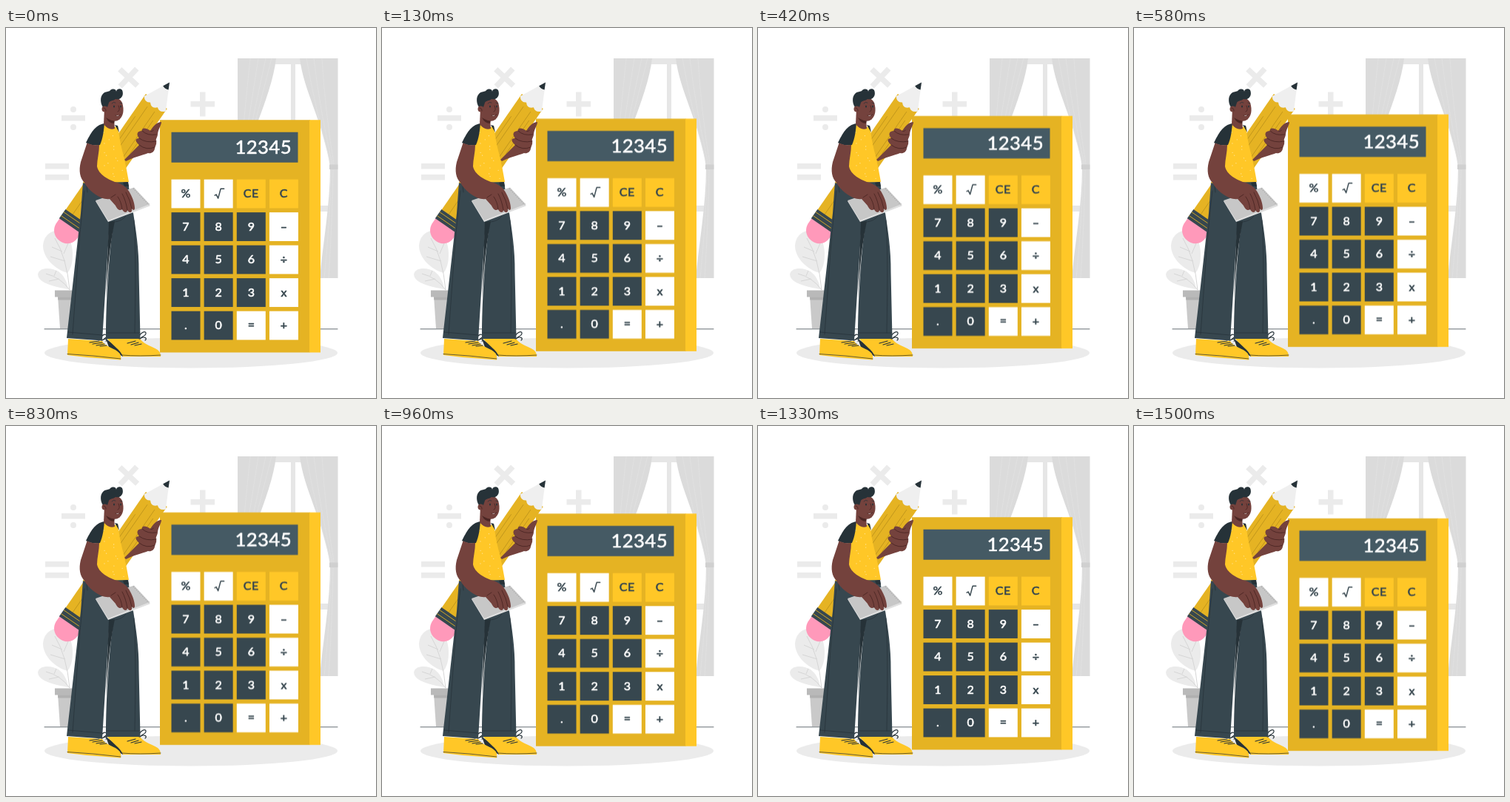
An HTML page for the animation above (1.54 s loop, 500 by 500 pixels).

```html
<!DOCTYPE html>
<html lang="en">
<head>
<meta charset="utf-8">
<title>Calculator</title>
<style>
html, body { margin: 0; width: 100%; height: 100%; overflow: hidden; background: #fff; }
svg { display: block; width: 100%; height: 100%; }
text {
  font-family: Lato, "Open Sans", sans-serif;
  text-anchor: middle;
  stroke: currentColor;
  stroke-width: .6;
  stroke-linejoin: round;
  fill: currentColor;
}
#calc { animation: float 770ms linear -65ms infinite alternate; }
@keyframes float {
  from { transform: translateY(.5px); }
  to { transform: translateY(-9.5px); }
}
.line, .lace { fill: none; stroke: #263238; stroke-width: .7; stroke-linecap: round; stroke-linejoin: round; }
.lace { stroke-width: 1.2; }
.skin { fill: #74423d; }
.skinLine { fill: none; stroke: #4b2624; stroke-width: .9; stroke-linecap: round; }
.dark { fill: #263238; }
.cloth { fill: #37474f; }
.yellow { fill: #ffc727; }
.gold { fill: #e5b323; }
</style>
</head>
<body>
<svg viewBox="0 0 500 500">
  <!-- window -->
  <g>
    <path fill="#e6e6e6" d="M360 41h42v8h-42zM385 41h6v90h-6zM423 240h12v8h-12z"/>
    <path fill="#dbdbdb" d="M313 41H365C362 68 350 101 339 130H313z"/>
    <path fill="#dbdbdb" d="M397 41H448.500V338H424C428 292 438 240 438 188C430 130 402 85 397 41z"/>
    <path fill="none" stroke="#e3e3e3" stroke-width=".7" d="M330 41L321 130M341 41L327 130M351 41L332 130M359 41L336 130M406 41Q418 110 439 184M416 41Q424 110 441 184M427 41Q431 110 443 184M439 192Q438 260 430 338M442 192Q441 260 436 338"/>
    <path fill="#d0d0d0" d="M437 184.500h11.500v6.500h-11.500z"/>
  </g>
  <!-- floating signs -->
  <g fill="#ebebeb">
    <g id="plus"><rect x="249.500" y="99" width="32.500" height="7.500"/><rect x="262" y="86.500" width="7.500" height="33"/></g>
    <use href="#plus" transform="translate(165.500 67) rotate(43) translate(-265.750 -103)"/>
    <rect x="75" y="118" width="32" height="7.500"/><circle cx="91" cy="110" r="4"/><circle cx="91" cy="134" r="4"/>
    <rect x="53" y="183" width="32" height="7.500"/><rect x="53" y="198" width="32" height="7.500"/>
  </g>
  <!-- plant -->
  <g>
    <path fill="#ebebeb" d="M83 331C68 327 50 312 50 294C51 278 64 272 76 273C91 281 95 317 83 331z"/>
    <path fill="#ebebeb" d="M84 353C69 350 44 346 43 333C45 322 63 324 71 329C79 335 83 344 84 353z"/>
    <path fill="none" stroke="#d6d6d6" stroke-width="1" d="M66 284Q82 310 86 354M54 332Q74 337 86 354M76 302l-14-6M80 315l-20-6M78 305l6-14M65 335l3-7M72 339l-14 3"/>
    <path fill="#c9c9c9" d="M70 362H104L101 406H73z"/>
    <path fill="#b9b9b9" d="M66 354.500h40v9H66z"/>
    <path fill="#b0b0b0" d="M70 363.500h33v4H70.300z"/>
  </g>
  <ellipse cx="250" cy="439" rx="198" ry="20.500" fill="#ebebeb"/>
  <path class="line" d="M52 406.800H448"/>

  <!-- pencil: local x runs from the tip to the eraser -->
  <g transform="translate(221 73.500) rotate(124.700)">
    <path fill="#ff99ba" d="M234-17.500H244C266-17 266 16 244 17.500H234z"/>
    <path class="gold" d="M31-17.500H224V17.500H31z"/>
    <path fill="#efefef" d="M0 0L35-18Q42-12 37-6Q44 0 37 6Q42 12 35 17.500z"/>
    <path class="dark" d="M0 0L9-4.500Q11 0 9 4.500z"/>
    <path fill="none" stroke="#bd931b" stroke-width=".8" d="M44-6H222M44 6H222M55-11H110M64 12H120"/>
    <path class="cloth" d="M221-18H236V18H221z"/>
    <path fill="none" stroke="#e5b323" stroke-width=".8" d="M225.500-18V18M231.500-18V18"/>
  </g>

  <g id="calc">
    <path class="gold" d="M208 124.600H411V439H208z"/>
    <path class="yellow" d="M410 124.600h15V439H410z"/>
    <path fill="#455a64" d="M223.500 141.200h171V182h-171z"/>
    <text x="347.700" y="170.500" font-size="25.700" letter-spacing=".4" color="#fff">12345</text>
  </g>

  <!-- far arm -->
  <path class="skin" d="M160 178L180 158C174 153 174 149 180 149C175 143 178 139 184 139C183 135 188 134 195 139C199 132 204 127 210 127C210 131 206 136 205 143C205 148 202 149 203 153C204 158 201 160 201 163C200 168 196 170 192 169C184 172 172 175 162 180z"/>
  <path class="skinLine" d="M184 139Q191 146 203 144M180 149Q189 156 203 153M180 158Q190 166 201 161M195 139Q198 141 199 138"/>

  <!-- shoes -->
  <path class="dark" d="M135 420L159 437L158 444L140 434z"/>
  <path class="yellow" d="M137 420H181C187 428 199 431 205 435Q209 438 209 444H158C155 435 143 428 137 420z"/>
  <path class="line" d="M157 442Q180 444 209 442"/>
  <path class="lace" d="M164 426l11-3M169 428l10-3M174 429l9-2M180 420C178 414 188 408 189 412C190 416 183 417 181 420C186 416 192 419 188 422"/>
  <path class="yellow" d="M84 420L130 423C134 431 148 433 153 439Q156 442 155 448.500L109 445L83 442z"/>
  <path class="line" d="M83 440.500L118 443L155 447"/>
  <path class="lace" d="M113 425l13-2M117 427l13-2M122 429l11-2M127 430l9-1M129 422C127 415 135 412 136 416C136 419 132 420 130 422C135 419 139 421 135 423"/>

  <!-- trousers -->
  <path class="cloth" d="M146 261L172 250C175 270 180 300 179.500 330L181.500 420L135 420C135 370 139 300 146 261z"/>
  <path class="cloth" d="M104 208.500L165 207L168 230L172 252L147 262L140 262L130 422.500L82 419C90 350 96 295 101 250z"/>
  <path class="dark" d="M139 262L147 261Q140 295 137.500 331L135 365z"/>
  <path class="line" d="M106 220Q100 270 96 330L90 414M84 411L130 415M136 412L181 412M173 260Q176 300 174 412M147 262Q157 261 162 254M109 213L110 222"/>

  <!-- torso -->
  <path class="yellow" d="M124 135L134 130L147 134L151 132C153 145 154 155 159 173Q163 190 166 208L104 209.500L113 185C119 175 123 166 124 135z"/>
  <path fill="none" stroke="#ffe59a" stroke-width="1.300" stroke-linecap="round" stroke-dasharray="0 13.300" d="M132 141L148 147L130 155L152 162L128 170L156 178L129 185L158 192L139 199L162 204"/>
  <path class="dark" d="M133 129C120 131 114 143 108 155Q117 160 127 158C131 149 132 139 133 129z"/>
  <path class="dark" d="M147 131L151 132L153 141z"/>
  <path class="dark" d="M158 209L164.500 208L166 214L160 214z"/>

  <!-- head -->
  <path class="skin" d="M133 109L132 130Q139 139 147 136L146 124z"/>
  <path fill="#4b2624" d="M135 121Q142 126 147 125L146 129Q139 129 135 121z"/>
  <path class="skin" d="M134 97C143 91 154 94 157 101C160 110 159 121 151 125C143 128 136 120 134 110z"/>
  <path class="dark" d="M133 109C128 105 126 94 131 89C134 85 139 87 141 84C145 81 149 83 149 86C149 82 155 81 157 84C160 91 155 98 148 96C144 99 140 98 139 101C138 104 137 107 136 110z"/>
  <circle class="skin" cx="133.500" cy="109.500" r="4"/>
  <path class="skinLine" d="M132 108Q135 108 135 112M152 105Q155 112 151 113M148 118Q152 120 155 117"/>
  <path class="line" d="M143 102Q145 99 148 101M154 101L157 102"/>
  <ellipse class="dark" cx="146" cy="106" rx="1" ry="1.500"/><ellipse class="dark" cx="155" cy="106" rx=".9" ry="1.500"/>
  <path fill="#fff" d="M148.500 117.800Q151 118.800 153 117.500Q151 120 148.500 117.800z"/>

  <!-- notepad -->
  <path fill="#e0e0e0" d="M121 234L138 262L194.500 240.500L194 237z"/>
  <path fill="#c7c7c7" d="M121 233L173 215.500L194 238L138 260z"/>
  <path fill="none" stroke="#a6a6a6" stroke-width="1.200" stroke-dasharray="1 2" d="M172 217L193 239"/>

  <!-- near arm -->
  <path class="skin" d="M109.500 155.500Q117 159 126 158C126 168 123 178 123 187C125 198 139 206 151 209C159 212 165 217 168 224C172 231 174 239 174 244Q173 248 170 244C171 250 167 251 164 246C164 250 159 250 157 245C153 248 150 244 148 240L140 231C130 233 113 222 106 209C100 203 98 193 101 181z"/>
  <path class="skinLine" d="M151 228Q156 235 157 245M157 224Q162 233 164 246M162 222Q168 233 170 244M142 229L148 225"/>
</svg>
<script>
const NS = 'http://www.w3.org/2000/svg';
const calc = document.getElementById('calc');
const add = (tag, attrs, label = '') => {
  const el = document.createElementNS(NS, tag);
  for (const key in attrs) el.setAttribute(key, attrs[key]);
  el.textContent = label;
  calc.append(el);
};
const rows = [['%', '√', 'CE', 'C'], [7, 8, 9, '–'], [4, 5, 6, '÷'], [1, 2, 3, 'x'], ['.', 0, '=', '+']];

rows.forEach((row, r) => row.forEach((label, c) => {
  const x = 223.5 + c * 44.15, y = 205 + r * 44.5;
  const number = typeof label === 'number' || label === '.';
  const clear = r === 0 && c > 1;
  const color = number ? '#fff' : '#37474f';
  add('rect', { x, y, width: 39, height: 38.8, fill: number ? '#37474f' : clear ? '#ffc727' : '#fff' });
  if (label === '√') {
    add('path', { d: `M${x + 14.5} ${y + 21.5}l2-1 2.500 5 3.500-13h4.500`, fill: 'none', stroke: color,
      'stroke-width': 1.5, 'stroke-linecap': 'round', 'stroke-linejoin': 'round' });
  } else {
    add('text', { x: x + 19.5, y: y + 24.5, 'font-size': 16, color, 'letter-spacing': clear ? .6 : 0 }, label);
  }
}));
</script>
</body>
</html>
```
